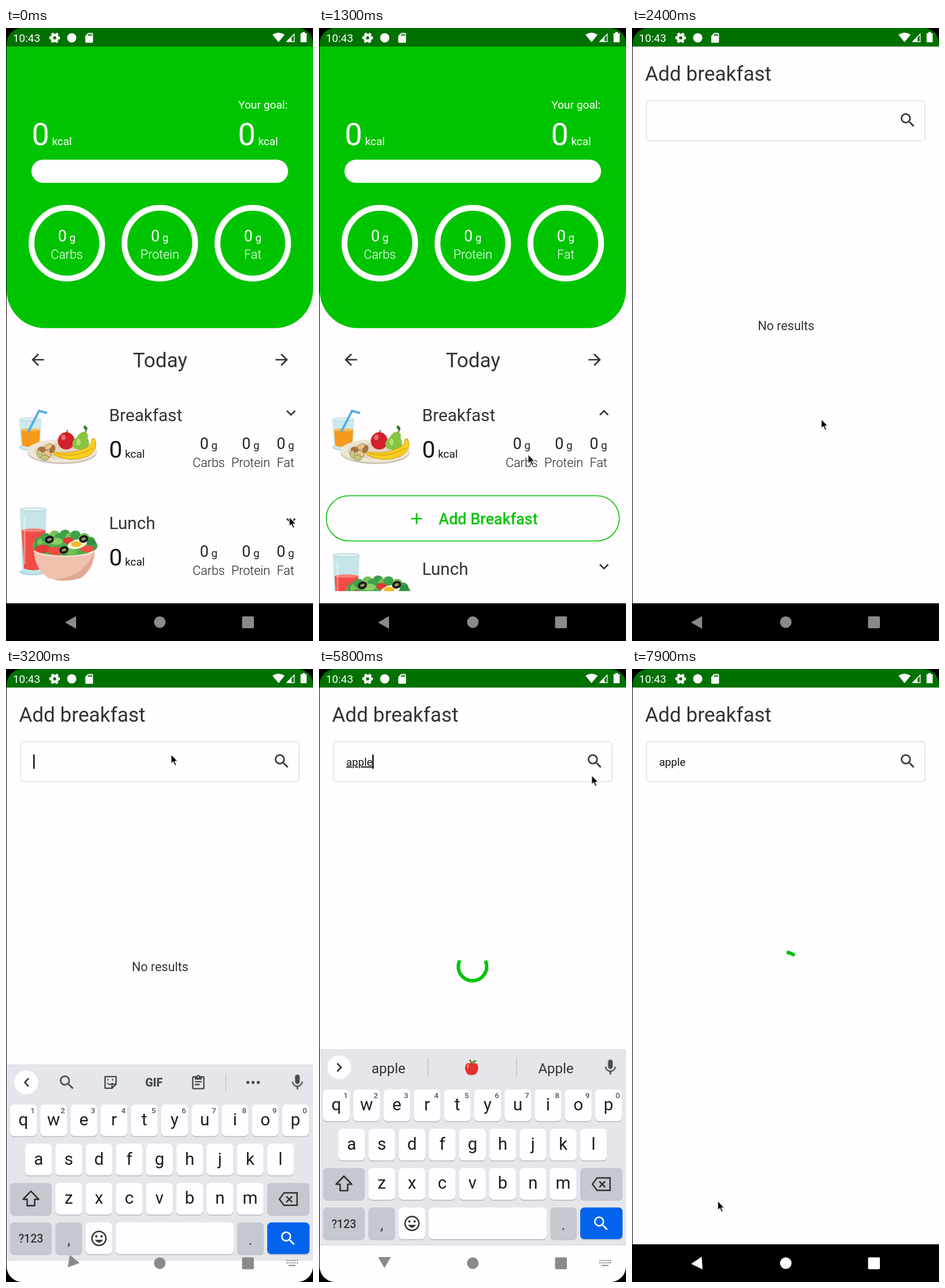
Recreate the animation shown at these times as an HTML page. Size 530 by 1057 pixels, loop 8000 ms.

```html
<!DOCTYPE html>
<html lang="en">
<head>
<meta charset="utf-8">
<title>Meal tracker</title>
<style>
html, body { margin: 0; width: 100%; height: 100%; overflow: hidden; background: #000; }
svg { display: block; width: 530px; height: 1057px; font-family: Roboto, "Noto Sans", sans-serif; }
.light { font-weight: 300; }
.medium { font-weight: 500; }
.heavy { font-weight: 800; }
.mid { text-anchor: middle; }
#query { text-decoration-skip-ink: none; }

#cursor, .screen > *, .lunch, .toggle, .button, .press, #keys, .back, .nav, .tools, .words, .typing, .empty, .ripple {
  animation: 8s linear infinite;
}
#cursor { animation-name: move; animation-timing-function: ease-in-out; }
.screen > * { animation-name: fade; }
.lunch { animation-name: drop; animation-timing-function: step-end; }
.toggle { animation-name: flip; animation-timing-function: step-end; transform-origin: 492px 663.6px; }
.button { animation-name: expand; animation-timing-function: step-end; }
.press { animation-name: press; animation-timing-function: step-end; }
#keys { animation-name: slide; }
.back { animation-name: turn; transform-origin: 111.5px 1023.5px; }
.nav { animation-name: whiten; animation-timing-function: step-end; }
.tools { animation-name: tools; animation-timing-function: step-end; }
.words { animation-name: words; animation-timing-function: step-end; }
.typing { animation-name: typing; animation-timing-function: step-end; }
.empty { animation-name: empty; animation-timing-function: step-end; }
.ripple { animation-name: ripple; transform-origin: 476px 159px; }

@keyframes move {
  0%, 2.5% { transform: translate(489px, 843px); }
  6.25%, 11.25% { transform: translate(489px, 657px); }
  16.25% { transform: translate(361px, 735px); }
  21.25%, 28% { transform: translate(341px, 855px); }
  33.75%, 54% { transform: translate(285px, 147px); }
  58.75% { transform: translate(407px, 156px); }
  64% { transform: translate(478px, 156px); }
  71.25% { transform: translate(482px, 156px); }
  81.25% { transform: translate(124px, 1006px); }
  84%, 94.5% { transform: translate(122px, 1023px); }
  98.75% { transform: translate(148px, 917px); }
  100% { transform: translate(150px, 910px); }
}
@keyframes fade { 0%, 25% { opacity: 0; } 28.5%, 100% { opacity: 1; } }
@keyframes drop { 0% { transform: none; } 8.75%, 100% { transform: translateY(79px); } }
@keyframes flip { 0% { transform: none; } 8.75%, 100% { transform: rotate(180deg); } }
@keyframes expand { 0% { opacity: 0; } 8.75%, 100% { opacity: 1; } }
@keyframes press { 0% { fill: #fffdff; } 22.5%, 100% { fill: #e0e0e2; } }
@keyframes slide {
  0%, 37.7% { transform: translateY(402px); animation-timing-function: cubic-bezier(.215, .61, .355, 1); }
  41.45%, 95% { transform: none; animation-timing-function: ease-in; }
  97.5%, 100% { transform: translateY(402px); }
}
@keyframes turn {
  0%, 38.875% { transform: none; animation-timing-function: cubic-bezier(.215, .61, .355, 1); }
  43.875%, 96.25% { transform: rotate(-90deg); animation-timing-function: cubic-bezier(.215, .61, .355, 1); }
  100% { transform: none; }
}
@keyframes whiten { 0% { fill: #8a8a8a; } 97%, 100% { fill: #fff; } }
@keyframes tools { 0% { opacity: 1; } 48.75%, 100% { opacity: 0; } }
@keyframes words { 0% { opacity: 0; } 48.75%, 100% { opacity: 1; } }
@keyframes typing { 0% { opacity: 0; } 39% { opacity: 1; } 97%, 100% { opacity: 0; } }
@keyframes empty { 0% { opacity: 1; } 68.175%, 100% { opacity: 0; } }
@keyframes ripple {
  0%, 66.2% { opacity: 0; transform: scale(.4); }
  66.3% { opacity: .13; transform: scale(.4); }
  68.5% { opacity: .13; transform: none; }
  70.5%, 100% { opacity: 0; transform: none; }
}
</style>
</head>
<body>
<svg id="stage" viewBox="0 0 530 1057"></svg>
<script>
const GREEN = '#00c400', PAPER = '#fffdff', INK = '#333', DP = 1.345;
const PATHS = {
  left: 'M20 11H7.83l5.59-5.59L12 4l-8 8 8 8 1.41-1.41L7.83 13H20z',
  right: 'M4 11h12.17l-5.59-5.59L12 4l8 8-8 8-1.41-1.41L16.17 13H4z',
  down: 'M16.59 8.59L12 13.17 7.41 8.59 6 10l6 6 6-6z',
  plus: 'M19 13h-6v6h-2v-6H5v-2h6V5h2v6h6z',
  search: 'M15.5 14h-.79l-.28-.27A6.47 6.47 0 0 0 16 9.5 6.5 6.5 0 1 0 9.5 16c1.61 0 3.09-.59 4.23-1.57l.27.28v.79l5 4.99L20.49 19zm-6 0C7 14 5 12 5 9.5S7 5 9.5 5 14 7 14 9.5 12 14 9.5 14z',
  card: 'M18 2h-8L4 8v12c0 1.1.9 2 2 2h12c1.1 0 2-.9 2-2V4c0-1.1-.9-2-2-2zm-6 6h-2V4h2zm3 0h-2V4h2zm3 0h-2V4h2z',
  mic: 'M12 14c1.66 0 3-1.34 3-3V5a3 3 0 0 0-6 0v6c0 1.66 1.34 3 3 3zm5.3-3c0 3-2.54 5.1-5.3 5.1S6.7 14 6.7 11H5c0 3.41 2.72 6.23 6 6.72V21h2v-3.28c3.28-.48 6-3.3 6-6.72z',
  clip: 'M19 3h-4.18a3 3 0 0 0-5.64 0H5a2 2 0 0 0-2 2v15a2 2 0 0 0 2 2h14a2 2 0 0 0 2-2V5a2 2 0 0 0-2-2zm-7 0a1 1 0 1 1 0 2 1 1 0 0 1 0-2zm7 17H5V5h2v3h10V5h2zM7 10h10v2H7zm0 4h7v2H7z'
};
const icon = (name, x, y, fill = INK, scale = DP) =>
  `<path d="${PATHS[name]}" fill="${fill}" fill-rule="evenodd" transform="translate(${x} ${y}) scale(${scale}) translate(-12 -12)"/>`;
const text = (s, x, y, size, cls = '', fill = INK, id = '') =>
  `<text id="${id}" x="${x}" y="${y}" font-size="${size}" class="${cls}" fill="${fill}">${s}</text>`;
const rect = (x, y, w, h, r, fill, more = '') =>
  `<rect x="${x}" y="${y}" width="${w}" height="${h}" rx="${r}" fill="${fill}" ${more}/>`;
const oval = (x, y, rx, ry, fill, more = '') =>
  `<ellipse cx="${x}" cy="${y}" rx="${rx}" ry="${ry}" fill="${fill}" ${more}/>`;
const path = (d, fill, more = '') => `<path d="${d}" fill="${fill}" ${more}/>`;
const line = (d, stroke, w, more = '') => path(d, 'none', `stroke="${stroke}" stroke-width="${w}" ${more}`);

const amount = (x, y, size, fill) =>
  text(`0<tspan font-size="18.9"> kcal</tspan>`, x, y, size, '', fill);
const macro = (name, x, y, fill, gap) =>
  text('0<tspan font-size="18.8"> g</tspan>', x, y, 26.9, 'mid', fill) +
  text(name, x, y + gap, 21.5, 'mid light', fill);
const macros = (xs, y, fill, gap) =>
  ['Carbs', 'Protein', 'Fat'].map((n, i) => macro(n, xs[i], y, fill, gap)).join('');
const meal = (name, y) =>
  text(name, 178, y, 29.6) + amount(178, y + 63, 40.4, '#151515') +
  macros([350, 422.5, 482.5], y + 48, '#222', 31);

function breakfastArt() {
  const nuts = [[62, 727], [72, 734], [58, 735], [80, 726], [73, 722], [67, 741]];
  return oval(42, 723, 19, 6, '#b9d9e2') + path('M23 675H61L59 724Q42 730 26 724Z', '#cde9ee') +
    path('M26 693H59L57 720Q42 725 28 720Z', '#f79a1c') + oval(42.5, 693, 16.5, 2.5, '#fdbb4c') +
    oval(42, 675, 18.5, 2.5, '#e2f4f6', 'stroke="#a5cfd9"') +
    line('M38 697L57 660L71 664', '#58aee6', 4) +
    oval(97, 732, 60, 20, '#cfc6bb') + oval(97, 729, 60, 20, '#efe5d4') + oval(97, 729, 48, 14, '#e3d6c0') +
    nuts.map(([x, y], i) => oval(x, y, 7, 4.5, ['#a9713f', '#e8c48a', '#c3c979'][i % 3],
      `stroke="#8a6238" stroke-width=".7" transform="rotate(${i * 37} ${x} ${y})"`)).join('') +
    oval(104, 712, 14.5, 15, '#d4202d') + oval(99, 706, 4, 5, '#ef6a6a') + line('M105 700Q104 696 107 693', '#6b3c1d', 1.5) +
    path('M137 696Q143 700 141 708Q147 718 139 725Q126 730 117 724Q110 714 122 706Q128 695 137 696Z', '#87c440') +
    oval(125, 714, 4, 6, '#b4dd72') + line('M137 697L140 691', '#6b3c1d', 1.5) + path('M139 695Q132 690 135 685Q143 687 139 695Z', '#397b33') +
    path('M82 731Q112 736 138 724Q150 718 148 709L153 708Q161 726 142 738Q112 751 83 736Z', '#f8cf1d', 'stroke="#cb981c"') +
    line('M87 734Q120 742 150 724', '#dba719', 1.5);
}

function lunchArt() {
  const leaves = Array.from({ length: 17 }, (_, i) => {
    const a = Math.PI * (1 + i / 16), x = 102 + 47 * Math.cos(a), y = 893 + 20 * Math.sin(a) + (i % 2) * 5;
    return oval(x, y, 9, 8, i % 3 ? '#3fa14a' : '#79c257');
  }).join('');
  const olive = (x, y) => oval(x, y, 6, 4.5, '#8e9c55', `stroke="#1c1a1c" stroke-width="4" transform="rotate(-20 ${x} ${y})"`);
  return oval(46, 938, 23, 6, '#b7dce2') + path('M24 830H70L66 936Q46 945 28 936Z', '#c6e5e9') +
    path('M27 866H68L64 932Q46 938 31 932Z', '#f14b47') + oval(47.5, 866, 20.5, 3, '#f98077') +
    oval(47, 830, 23, 3, '#def1f3', 'stroke="#a2cdd3"') + line('M32 842V925', '#fff', 3, 'opacity=".35"') +
    leaves + oval(102, 897, 48, 15, '#4fae4d') +
    oval(64, 898, 13, 7, '#e23b35') + oval(86, 885, 12, 6, '#8dcf62') + oval(86, 902, 14, 7, '#ed4c3e') +
    oval(108, 884, 9, 6, '#e43a35') + oval(140, 898, 12, 6, '#ee5140') + oval(146, 887, 9, 5, '#2f8f43') +
    oval(123, 890, 17, 8, '#fff3df', 'transform="rotate(-14 123 890)"') + oval(121, 890, 9, 5, '#f7b927') +
    oval(112, 903, 10, 5, '#75c153') + olive(75, 882) + olive(100, 900) + olive(134, 881) +
    path('M48 901Q60 909 101 910Q142 909 153 901Q152 934 128 949Q101 956 74 949Q50 934 48 901Z', '#f0c2ad') +
    path('M153 901Q152 934 128 949Q101 956 82 951Q137 946 153 901Z', '#dfa993') +
    line('M48 902Q60 910 101 911Q142 910 153 902', '#f9dccd', 2.5);
}

const home = () =>
  rect(1, 32, 529, 960, 0, PAPER) +
  path('M1 32H530V451.5A66 66 0 0 1 464 517.5H67A66 66 0 0 1 1 451.5Z', GREEN) +
  text('Your goal:', 401, 139, 19.2, '', '#fff') + amount(44.5, 202, 53.8, '#fff') + amount(400.5, 202, 53.8, '#fff') +
  rect(44, 227, 443, 40, 20, '#fff') +
  [105, 265.5, 426].map(x => `<circle cx="${x}" cy="371" r="61" fill="none" stroke="#fff" stroke-width="10"/>`).join('') +
  macros([105, 265.5, 426], 368, '#fff', 30) +
  icon('left', 55, 572) + text('Today', 266, 585, 35, 'mid') + icon('right', 476, 572) +
  `<g clip-path="url(#list)">${breakfastArt()}${meal('Breakfast', 678)}
    <g class="toggle">${icon('down', 492, 663.6)}</g>
    <g class="button">
      ${rect(12.5, 806.5, 506, 78, 39, PAPER, `class="press" stroke="${GREEN}" stroke-width="1.6"`)}
      ${icon('plus', 168.5, 846, GREEN)}${text('Add Breakfast', 206.5, 856, 26.9, 'medium', GREEN)}
    </g>
    <g class="lunch">${lunchArt()}${meal('Lunch', 864)}${icon('down', 492, 849.6)}</g>
  </g>`;

const search = () =>
  `<g class="screen">
    ${rect(1, 32, 529, 960, 0, PAPER)}${text('Add breakfast', 22.5, 91, 35)}
    ${rect(25, 125, 481, 69.5, 6, PAPER, 'stroke="#000" stroke-opacity=".12" stroke-width="1.5"')}
    ${icon('search', 476, 159)}
    <g>${text('No results', 266, 521, 21.5, 'mid empty')}</g>
    <g><circle class="ripple" cx="476" cy="159" r="32"/></g>
    <g>${text('', 47, 167, 18.6, '', '#111', 'query')}
      ${rect(47, 147.5, 2.5, 24.5, 0, '#111', 'id="caret"')}
      <path id="spinner" fill="none" stroke="${GREEN}" stroke-width="6" stroke-linecap="square"/></g>
  </g>`;

const key = (x, y, w, fill = PAPER) => rect(x, y + 1.5, w, 55, 7, '#c3c5cb') + rect(x, y, w, 54.5, 7, fill);
function keyboard() {
  const GREY = '#c6c8d0', DARK = '#46494d', STEP = 52.2;
  const rows = [['qwertyuiop', 7], ['asdfghjkl', 33.2], ['zxcvbnm', 85.3]];
  const letters = rows.map(([chars, x0], r) => [...chars].map((c, i) => {
    const x = x0 + i * STEP, y = 725 + r * 67.7;
    return key(x, y, 46) + text(c, x + 23, y + 36, 29.5, 'mid', '#1d1d1f') +
      (r ? '' : text((i + 1) % 10, x + 39, y + 15, 13.5, 'mid medium', '#55575c'));
  }).join('')).join('');
  const chevron = d => line(d, INK, 2.6);
  const strip = `<circle cx="35" cy="687" r="20.5" fill="${PAPER}"/>`;
  const tools = chevron('M39 680L32.5 687L39 694') + icon('search', 105, 687, DARK) +
    line('M171 677H190V690L183 697H171ZM183 697V690H190', DARK, 2.4, 'stroke-linejoin="round"') +
    line('M175 688Q179 693 184 688M176 681V684M184 681V684', DARK, 2) +
    text('GIF', 255.5, 694, 19.5, 'mid heavy', DARK) + icon('clip', 332, 687, DARK, 1.2) +
    line('M379.5 672V702', '#c2c4c9', 1.4) + [417.5, 426.5, 435.5].map(x => oval(x, 687, 2.7, 2.7, DARK)).join('');
  const words = chevron('M31.5 680L38 687L31.5 694') + text('', 120, 696.5, 24, 'mid', INK, 'guess') +
    line('M188 671V703M341 671V703', '#bfc1c7', 1.4) +
    path('M263 681Q253 676 252 688Q254 702 263 700Q273 702 275 688Q274 676 263 681Z', '#e3312d') +
    oval(257, 685, 2, 4, '#f47a6d') + line('M263 682Q263 677 260 674', '#7b4a26', 2) + path('M263 680Q265 673 272 675Q270 681 263 680Z', '#57a83d') +
    text('Apple', 409, 696.5, 24, 'mid');
  return `<g id="keys">${rect(1, 656, 529, 402, 0, '#d9dbe0')}${rect(1, 657, 529, 402, 0, '#e4e6eb')}
    ${rect(1, 993, 529, 70, 0, PAPER)}${line('M1 993.5H530', '#d8dade', 1)}
    ${strip}<g class="tools">${tools}</g><g class="words">${words}</g>${icon('mic', 503, 687, DARK)}${letters}
    ${key(7, 860.4, 72, GREY)}${line('M43 874.5L56.5 888.5H49.5V899.5H36.5V888.5H29.5Z', INK, 2.6, 'stroke-linejoin="round"')}
    ${key(451, 860.4, 73, GREY)}${line('M480 877.5H502.5V899H480L472 888.3ZM484 883.5L494 893.5M494 883.5L484 893.5', INK, 2.5)}
    ${key(7, 928.5, 72, GREY)}${text('?123', 43, 963.5, 19.5, 'mid medium')}
    ${key(85.3, 928.5, 46, GREY)}${text(',', 108.5, 967, 26, 'mid')}
    ${key(137.5, 928.5, 46)}<circle cx="160.5" cy="956" r="12" fill="none" stroke="${INK}" stroke-width="2.5"/>
    ${oval(156, 952.5, 2, 2, INK)}${oval(165, 952.5, 2, 2, INK)}${path('M153.5 958.5H167.5Q160.5 968 153.5 958.5Z', INK)}
    ${key(189.5, 928.5, 203.5)}${key(399, 928.5, 46, GREY)}${text('.', 422, 967, 26, 'mid')}
    ${key(451, 928.5, 73, '#0363ec')}${icon('search', 487, 956, '#fff')}</g>`;
}

const status = () =>
  rect(1, 0, 529, 32, 0, '#007100') + text('10:43', 12, 23.5, 18.9, '', '#fff') +
  `<circle cx="84" cy="17" r="5" fill="none" stroke="#fff" stroke-width="4.5"/>` +
  `<circle cx="84" cy="17" r="7.8" fill="none" stroke="#fff" stroke-width="3" stroke-dasharray="4.5 3.668" transform="rotate(-16 84 17)"/>` +
  `<circle cx="113.5" cy="17" r="8" fill="#fff"/>` + icon('card', 143.5, 17, '#fff', .84) +
  path('M460 11.5Q470.5 4.5 481 11.5L470.5 24.5Z', '#fff') +
  line('M485 23.5L497.5 10.5V23.5Z', '#fff', 1.4) + path('M483.5 24L493 14V24Z', '#fff') +
  path('M508.5 9H511.5V7H516V9H519V24.5H508.5Z', '#fff');

const nav = () =>
  `<g class="nav"><path class="back" d="M102 1025L121 1014V1036Z"/>
    <circle cx="265.5" cy="1024.5" r="10"/><rect x="407.5" y="1014.5" width="20.5" height="20.5" rx="2"/></g>
  <g class="typing">${line('M484 1020H504M484 1024H504', '#8a8a8a', 2, 'stroke-dasharray="2.2 1.36"')}
    ${line('M488 1028.5H500', '#8a8a8a', 2)}</g>`;

document.getElementById('stage').innerHTML =
  `<clipPath id="list"><rect x="1" y="600" width="529" height="371"/></clipPath>
  <clipPath id="glass"><rect x="1" width="529" height="1057" rx="27"/></clipPath>
  <g clip-path="url(#glass)">${home()}${search()}${status()}
    ${rect(1, 992, 529, 65, 0, '#000')}${keyboard()}${nav()}</g>
  <g id="cursor">${path('M0 0V16.5L3.7 13L6.5 19.5L9.2 18.3L6.5 12H11.5Z', '#000', 'stroke="#fff" stroke-width="1.2"')}</g>`;

const $ = id => document.getElementById(id);
const query = $('query'), caret = $('caret'), spinner = $('spinner'), guess = $('guess');
const LOOP = 8000, FOCUS = 3000, TYPE = 3900, LAST = 4350, LOAD = 5454, HIDE = 7700;

// Progress along a curve whose y controls are 0, 0, 1, 1.
function curve(x, a, b, c, d) {
  let lo = 0, hi = 1;
  for (let i = 0; i < 20; i++) {
    const s = (lo + hi) / 2, r = 1 - s;
    if (a * r ** 3 + 3 * b * s * r * r + 3 * c * s * s * r + d * s ** 3 < x) lo = s; else hi = s;
  }
  return lo * lo * (3 - 2 * lo);
}

function spin(t) {
  if (t < LOAD) return '';
  const p = (t - LOAD) / 1333 % 1;
  const tail = p < .5 ? 0 : curve(p, .5, .7, .6, 1);
  const head = p < .5 ? curve(p, 0, .2, .1, .5) : 1;
  const turn = 146.35 + .1705 * (t - 6900) + 90 * p;
  const at = deg => {
    const a = deg * Math.PI / 180;
    return `${265 + 24.5 * Math.cos(a)} ${513 + 24.5 * Math.sin(a)}`;
  };
  const sweep = Math.max(270 * (head - tail), .5), from = turn + 270 * tail;
  return `M${at(from)}A24.5 24.5 0 ${sweep > 180 ? 1 : 0} 1 ${at(from + sweep)}`;
}

const start = performance.now();
function draw() {
  const t = (performance.now() - start) % LOOP;
  const count = t < TYPE ? 0 : 1 + Math.floor((t - TYPE) / (LAST - TYPE) * 4);
  const typed = 'apple'.slice(0, count);
  if (query.textContent !== typed) query.textContent = guess.textContent = typed;
  query.style.textDecoration = t < HIDE ? 'underline' : 'none';
  caret.setAttribute('x', 47 + (typed ? query.getComputedTextLength() - .5 : 0));
  const beat = t < TYPE ? t - FOCUS : t < LAST ? 0 : t - LAST;
  caret.style.opacity = t >= FOCUS && beat % 1000 < 500 ? 1 : 0;
  spinner.setAttribute('d', spin(t));
  requestAnimationFrame(draw);
}
draw();
</script>
</body>
</html>
```
